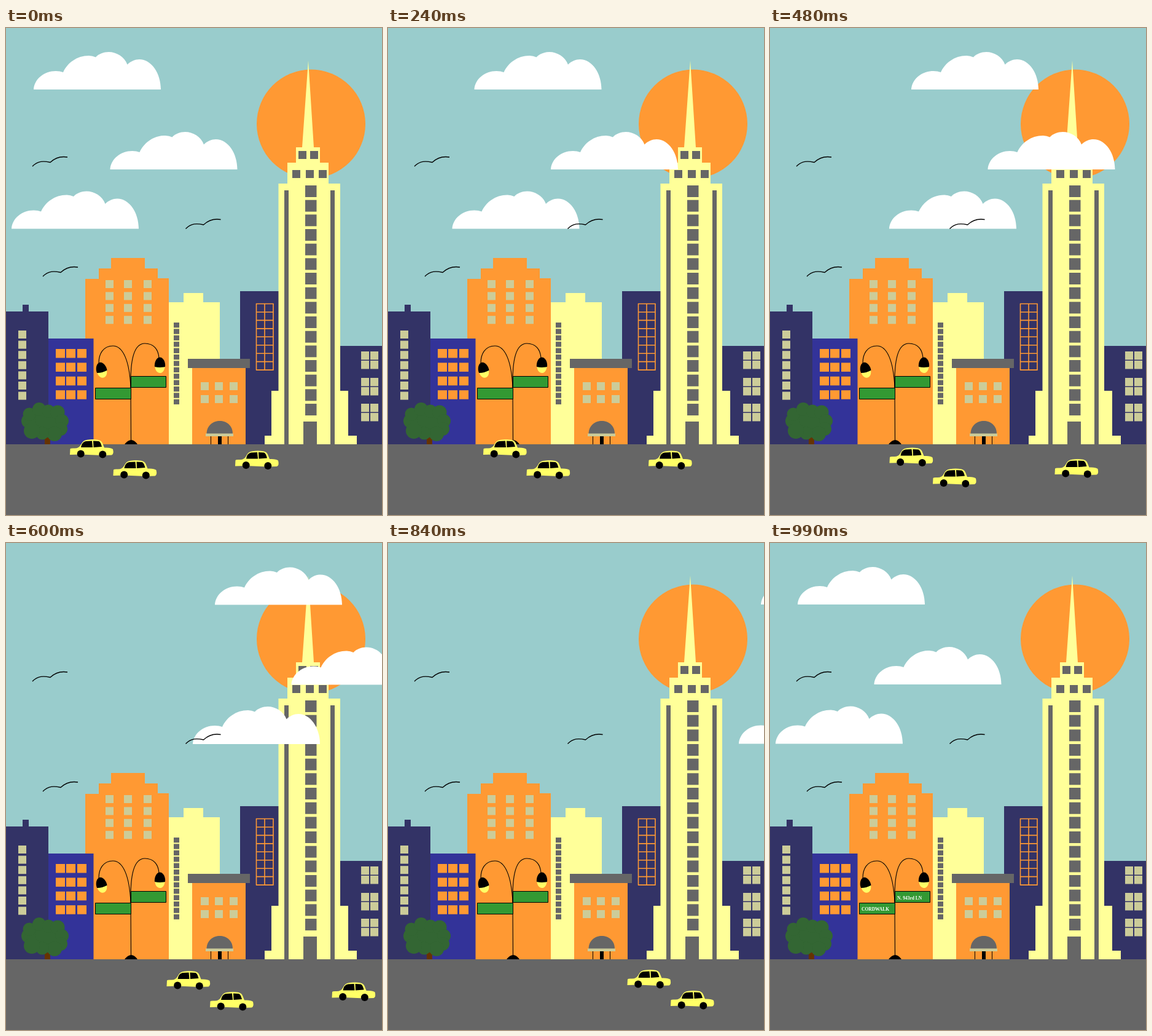
These frames come from a looping animation (612 px wide and 792 px high, 1.02 s). An HTML page:

```html
<!DOCTYPE html>
<html lang="en">
<head>
<meta charset="utf-8">
<title>City morning</title>
<style>
html, body { margin: 0; width: 100%; height: 100%; overflow: hidden; background: #9cc; }
svg { display: block; width: 612px; height: 792px; }
text { font: bold 7.5px "Liberation Serif", "Times New Roman", serif; fill: #fff; }
</style>
</head>
<body>
<svg id="stage" viewBox="0 0 612 792" xmlns="http://www.w3.org/2000/svg">
  <defs>
    <path id="cloud" fill="#fff" d="M0 0C1 -17 17 -30 36 -30Q43 -30 48 -28C55 -43 70 -55 90 -55Q96 -55 101 -52.5C106 -58 114 -61 122 -61C135 -61 148 -53 152.5 -40.5C158 -46 165 -49 172 -49C192 -49 207 -26 207 0Z"/>
    <path id="bird" fill="none" stroke="#000" stroke-width="1.3" d="M0 0C9 -9 18 -9 29 -6.500C37 -14 45 -17 57 -15"/>
    <g id="car">
      <path fill="#ff6" d="M0 25L.5 15.500Q1 14 8 14.500Q15 14.500 18 8.500Q21 1.500 28 .7Q37 -.5 46 .7Q51 1.500 53 6L56 13.500Q67 13 70 16Q72 24 68 25.500L53 26L18 24.500Z"/>
      <path d="M18 13Q19.500 4 26 3L36 2.500L37 13ZM38.500 13L38 2.500L47 3Q50 4 52 12Z"/>
      <circle cx="17.700" cy="23.500" r="6"/>
      <circle cx="53.300" cy="24.500" r="6"/>
    </g>
    <g id="bulb">
      <path fill="#ff6" d="M-8 2C-8 9 -4 13 0 13S8 9 8 2Z"/>
      <path d="M-8.500 3C-9.500 -5 -5 -12.500 0 -12.500S9.500 -5 8.500 3Q0 5 -8.500 3Z"/>
    </g>
  </defs>
  <rect width="612" height="792" fill="#9cc"/>
  <circle cx="496.500" cy="156" r="88.500" fill="#f93"/>
  <g id="city"></g>
  <g id="tree"></g>
  <g id="lamp">
    <g fill="none" stroke="#000" stroke-width="1.100">
      <path d="M203.500 672L203 585C201 540 190 517 174 517C158 517 151 530 151 545"/>
      <path d="M203 585C202 540 208 513 226 513C240 513 248 522 249 537"/>
    </g>
    <use href="#bulb" transform="translate(155.500 556) rotate(-15)"/>
    <use href="#bulb" transform="translate(250.500 548)"/>
    <g fill="#393" stroke="#000">
      <path d="M145.500 585.500h58v18h-58ZM203.500 566.500h57v18h-57Z"/>
    </g>
    <path d="M193 677Q204 663 214 677Z"/>
  </g>
  <rect y="677" width="612" height="115" fill="#666"/>
  <g id="names">
    <text x="149" y="598">CORDWALK</text>
    <text x="207" y="579.500">N. 943rd LN</text>
  </g>
  <g id="clouds">
    <use href="#cloud" x="45" y="100"/>
    <use href="#cloud" x="169.500" y="230"/>
    <use href="#cloud" x="9" y="326.500"/>
  </g>
  <use href="#bird" x="43" y="225"/>
  <use href="#bird" x="292.500" y="326.500"/>
  <use href="#bird" x="60" y="404"/>
  <g id="cars">
    <use href="#car" x="104" y="669"/>
    <use href="#car" x="174.500" y="703"/>
    <use href="#car" x="373" y="687.500"/>
  </g>
</svg>
<script>
const $ = id => document.getElementById(id);
const GREY = "#666", NAVY = "#336", BLUE = "#339", ORANGE = "#f93", CREAM = "#ff9", SAND = "#cc9";

function add(parent, tag, attrs) {
  const el = document.createElementNS("http://www.w3.org/2000/svg", tag);
  for (const key in attrs) el.setAttribute(key, attrs[key]);
  $(parent).appendChild(el);
}
const shape = (fill, d) => add("city", "path", { fill, d });
const rect = (fill, x, y, width, height) => add("city", "rect", { fill, x, y, width, height });

function windows(fill, xs, ys, w, h) {
  for (const x of xs) for (const y of ys) rect(fill, x, y, w, h);
}
const series = (start, step, count) => Array.from({ length: count }, (_, i) => start + i * step);

function drawCity() {
  shape(NAVY, "M0 461H27V450H37V461H69V677H0Z");
  windows(SAND, [20], series(492, 16.6, 7), 13, 13);

  shape(ORANGE, "M129 408H151V391H171V374H226V391H247V407H265V677H129Z");
  windows(SAND, [162, 192, 224], series(410, 19.4, 4), 13, 13);

  rect(BLUE, 69, 505, 73.5, 172);
  windows(ORANGE, [81, 98, 116], series(522, 22.4, 4), 15, 14.5);

  shape(CREAM, "M265 446H289V431H321V446H348V677H265Z");
  windows(GREY, [273], series(479, 10.4, 13), 9, 8.3);

  rect(NAVY, 381, 428, 63, 249);
  let grid = "M407.500 448V556.500M421 448V556.500M435 448V556.500";
  for (const y of series(448.5, 13.45, 9)) grid += `M407 ${y}H435.500`;
  add("city", "path", { d: grid, stroke: ORANGE, "stroke-width": 1.6 });

  rect(ORANGE, 303, 552, 87, 125);
  rect(GREY, 296, 538, 101, 15);
  windows(SAND, [317, 340, 364], [576, 597], 13, 13);
  shape(GREY, "M326.500 660C327 632 369 632 369 660Z");
  rect(SAND, 325, 659.5, 45, 4.5);
  rect("#000", 345, 664, 6, 13);
  windows("#000", [333, 361], [664], 1, 13);

  rect(NAVY, 544, 517, 68, 160);
  windows(SAND, [578, 593], [526, 541, 569, 584, 611, 626], 13, 13.5);

  shape(CREAM, "M492 53L501 194H511V219H525V253H544V590H557V663H571V677H421V663H432V590H443.500V253H458V219H472V194H482Z");
  windows(GREY, [476, 495], [200], 13, 13);
  windows(GREY, [466, 488, 509], [231], 13, 13);
  windows(GREY, [487], series(256, 23.67, 16), 18.5, 19);
  windows(GREY, [453, 528], [264], 7, 413);
  rect(GREY, 484, 640, 22, 37);
}

function drawTree() {
  add("tree", "rect", { x: 63, y: 666, width: 9, height: 11, fill: "#630" });
  add("tree", "ellipse", { cx: 64, cy: 640, rx: 33, ry: 26, fill: "#363" });
  const leaves = [[37, 639, 12], [38, 628, 10.5], [54, 620, 11], [69, 623, 10.5], [84, 625, 11.5],
    [91, 639, 11], [89, 652, 11], [79, 660, 12], [59, 659, 10.5], [42, 655, 13]];
  for (const [cx, cy, r] of leaves) add("tree", "circle", { cx, cy, r, fill: "#363" });
}

// start time, cloud shift x and y, car shift x and y
const LOOP = 1020, REST = 990;
const poses = [
  [0, 0, 0, 0, 0],
  [120, 48, 0, 25.5, 0],
  [240, 95.5, 0, 51, 0],
  [360, 214, -6, 78, 13.5],
  [480, 185, 0, 90.5, 13.5],
  [600, 295, 0.5, 157.5, 27],
  [720, 428, 0, 221, 30],
  [840, 562, 0, 285.5, 25],
  [960, 690, 0, 349, 25],
  [REST, 0, 0, 0, 0]
];

function render(time) {
  const t = time % LOOP;
  const [, cloudX, cloudY, carX, carY] = poses.filter(p => p[0] <= t).pop();
  const resting = t >= REST;
  $("clouds").setAttribute("transform", `translate(${cloudX} ${cloudY})`);
  $("cars").setAttribute("transform", `translate(${carX} ${carY})`);
  $("cars").style.display = resting ? "none" : "";
  $("names").style.display = resting ? "" : "none";
}

drawCity();
drawTree();
render(0);
const begin = performance.now();
function tick() {
  render(performance.now() - begin);
  requestAnimationFrame(tick);
}
requestAnimationFrame(tick);
</script>
</body>
</html>
```
